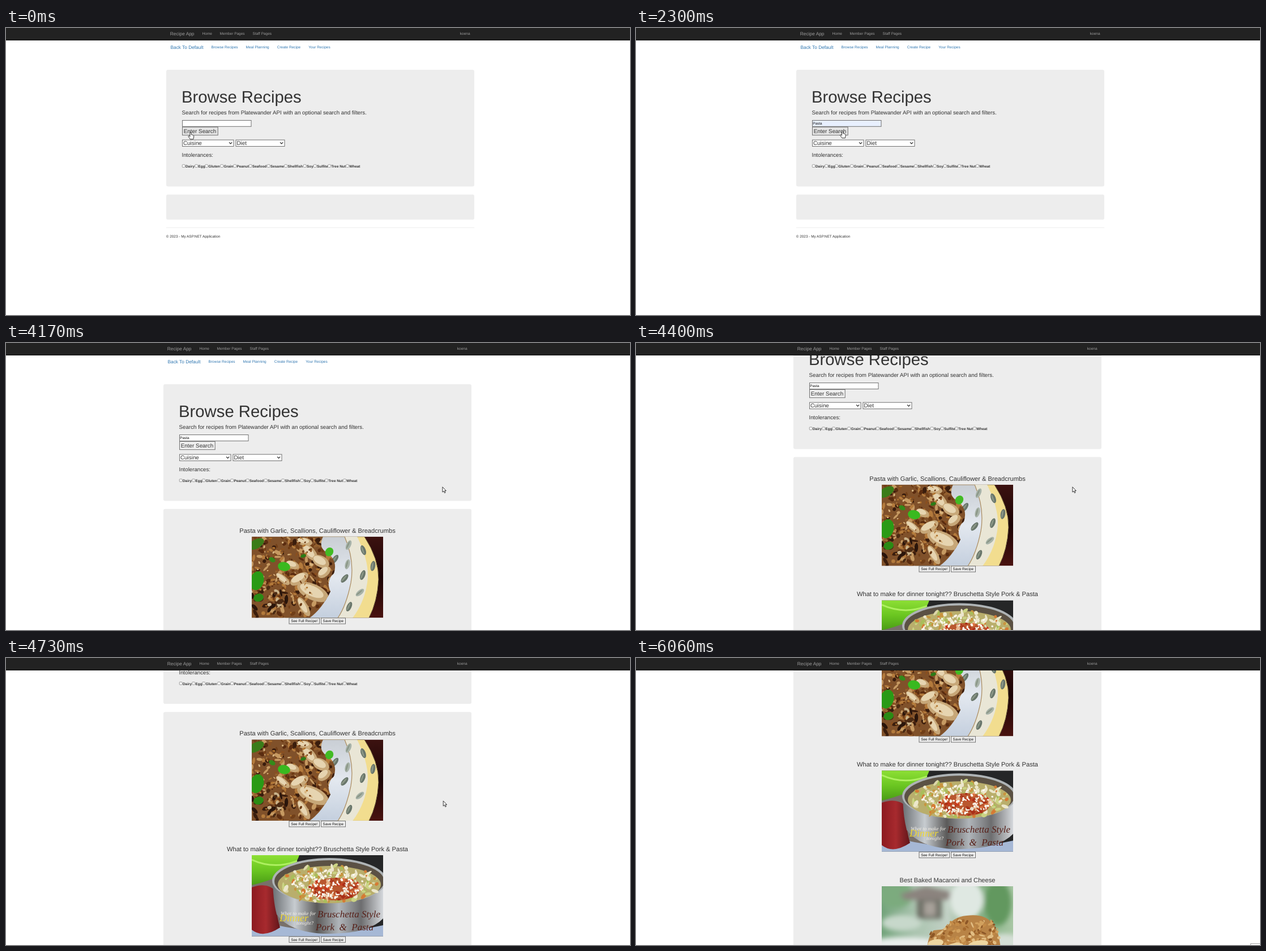
An HTML page for the animation above (6.12 s loop, 1102x508 px).

```html
<!DOCTYPE html>
<html lang="en">
<head>
<meta charset="utf-8">
<title>Recipe App</title>
<style>
html, body { margin: 0; width: 100%; height: 100%; overflow: hidden; background: #fff; }
svg { display: block; width: 1102px; height: 508px; }
text { font-family: "Liberation Sans", Arial, sans-serif; text-rendering: geometricPrecision; white-space: pre; }
</style>
</head>
<body>
<svg id="stage" viewBox="0 0 1102 508"></svg>
<script>
const LOOP = 6120, LOADED = 2960;
const INK = '#333', LINK = '#2f76b0', PANEL = '#ededed', PALE = '#9d9d9d';

// ---------- drawing helpers ----------
function add(parent, tag, attrs = {}) {
  const node = document.createElementNS('http://www.w3.org/2000/svg', tag);
  for (const key in attrs) node.setAttribute(key, attrs[key]);
  return parent.appendChild(node);
}
const group = (parent, attrs) => add(parent, 'g', attrs);
const path = (parent, d, fill, more) => add(parent, 'path', { d, fill, ...more });
const rect = (parent, x, y, width, height, fill, more) =>
  add(parent, 'rect', { x, y, width, height, fill, ...more });
const oval = (parent, cx, cy, rx, ry, fill, turn = 0) =>
  add(parent, 'ellipse', { cx, cy, rx, ry, fill, transform: `rotate(${turn} ${cx} ${cy})` });
function label(parent, x, y, size, str, fill = INK, more) {
  const node = add(parent, 'text', { x, y, 'font-size': size, fill, ...more });
  node.textContent = str;
  return node;
}
const framed = (parent, x, y, w, h, fill, line = '#707070') =>
  rect(parent, x + .5, y + .5, w - 1, h - 1, fill, { stroke: line, 'stroke-width': 1 });
function gradient(id, vertical, colours) {
  const g = add(defs, 'linearGradient', { id, x2: vertical ? 0 : 1, y2: vertical ? 1 : 0 });
  colours.forEach((c, i) => add(g, 'stop', { offset: i / (colours.length - 1), 'stop-color': c }));
  return `url(#${id})`;
}
function clip(id, d) {
  add(add(defs, 'clipPath', { id }), 'path', { d });
  return { 'clip-path': `url(#${id})` };
}
function seeded(seed) {
  return () => (seed = (seed * 16807) % 2147483647) / 2147483647;
}
function crumbs(parent, count, seed, place, size, colours) {
  const rnd = seeded(seed);
  for (let i = 0; i < count; i++) {
    const [x, y] = place(rnd);
    oval(parent, x, y, size * (.4 + rnd()), size * (.3 + rnd() * .5),
      colours[Math.floor(rnd() * colours.length)], rnd() * 180);
  }
}
const inOval = (cx, cy, rx, ry) => rnd => {
  const a = rnd() * Math.PI * 2, r = Math.sqrt(rnd());
  return [cx + Math.cos(a) * rx * r, cy + Math.sin(a) * ry * r];
};

const svg = document.getElementById('stage');
const defs = add(svg, 'defs');
const photoClip = clip('photo', 'M0 0H232V143.5H0Z');
const blur = add(defs, 'filter', { id: 'soft', x: '-20%', y: '-20%', width: '140%', height: '140%' });
add(blur, 'feGaussianBlur', { stdDeviation: 4 });

// ---------- photos, 232 x 143.5 each ----------
function plate(g) {
  rect(g, 0, 0, 232, 144, gradient('wood', true, ['#3c1210', '#1c0506', '#4a1310']));
  path(g, 'M60 0H199Q225 40 224 76Q222 115 207 144H60Z', '#f2dd8f', { stroke: '#55452f', 'stroke-width': 1 });
  path(g, 'M60 0H186Q206 40 205 72Q202 112 178 144H60Z', '#e9e6d6');
  path(g, 'M60 0H164Q182 42 175 82Q167 122 152 144H60Z',
    gradient('china', true, ['#c9ced4', '#e3e8ef', '#c4cfde']), { stroke: '#a98a5e', 'stroke-width': 1.2 });
  [[171, 15, 25], [197, 24, -20], [147, 40, 35], [169, 49, 15], [164, 74, 40],
   [196, 68, 20], [191, 99, 50], [172, 124, 25], [214, 52, 10]].forEach(([x, y, turn], i) => {
    oval(g, x, y, 4.2, 9, i % 3 ? '#69766b' : '#a8b3a9', turn);
    oval(g, x - 1, y, 1.4, 7, '#8b9787', turn);
  });
  const shape = 'M0 0H126Q117 18 131 27Q153 42 145 65Q130 78 139 97Q124 128 102 144H0Z';
  path(g, shape, '#80512a');
  const food = group(g, clip('food', shape));
  crumbs(food, 260, 71, r => [r() * 145, r() * 144], 5, ['#5a2c10', '#94602f', '#b37a3c', '#3a1d0d', '#c69a62', '#713f18']);
  [[103, 28, 18, 9, 50], [122, 44, 16, 10, 30], [108, 98, 30, 14, 25], [84, 75, 18, 9, -30],
   [72, 50, 12, 7, 20], [128, 63, 13, 8, -40], [92, 124, 19, 7, 60], [55, 75, 15, 6, 40],
   [93, 9, 14, 7, 10]].forEach(([x, y, a, b, turn]) => {
    oval(food, x, y, a, b, '#c7a778', turn);
    oval(food, x - 2, y - 2, a * .75, b * .65, '#e6d4b0', turn);
  });
  crumbs(food, 150, 19, inOval(55, 65, 65, 72), 2.6, ['#b1742f', '#6d3a13', '#d9b681', '#8b4f1e']);
  crumbs(food, 25, 33, inOval(20, 120, 45, 30), 6, ['#2a150b', '#4c2b14', '#c9b28a']);
  oval(g, 9, 78, 12, 17, '#2a9a16', 15);
  oval(g, 12, 108, 9, 7, '#2b8b15', -15);
  oval(g, 8, 13, 15, 8, '#3b7c19', -30);
  oval(g, 57, 53, 11, 8, '#39b91f', 10);
  oval(g, 137, 27, 7, 8, '#42bb24', 30);
  oval(g, 91, 34, 5, 3, '#2c7c17', -20);
  oval(g, 36, 41, 6, 4, '#348a1a', 30);
}

function pan(g) {
  rect(g, 0, 0, 232, 144, '#252627');
  path(g, 'M0 48L60 30L80 144H0Z', '#78706a');
  path(g, 'M0 112Q120 150 232 124V144H0Z', '#a6b8d5');
  path(g, 'M0 0H84Q74 31 34 43Q14 50 0 53Z', gradient('dish', true, ['#8ddf35', '#6bc621', '#4a9c15']));
  path(g, 'M0 8Q40 26 80 10', 'none', { stroke: '#aef060', 'stroke-width': 3 });
  path(g, 'M0 57Q28 46 46 66Q40 96 50 128Q20 148 0 132Z', gradient('cloth', false, ['#8c1a20', '#a72a2e', '#61161a']));
  path(g, 'M37 38Q37 78 44 105Q70 140 140 139Q208 138 232 112V32Z',
    gradient('steel', false, ['#6c7074', '#c7ccd0', '#5b5a59', '#b0b5ba', '#6d6d6f', '#d5d8dc']));
  oval(g, 137, 45, 101, 40, '#aeb3b5');
  oval(g, 137, 46, 97, 37, '#5b5144');
  oval(g, 137, 52, 91, 33, '#b9ae6c');
  crumbs(g, 170, 5, inOval(137, 50, 89, 33), 5, ['#dcd7a8', '#a9bd5b', '#ece7cb', '#c8943f', '#cbd384', '#d57b35']);
  oval(g, 148, 60, 43, 20, '#b9572f');
  crumbs(g, 70, 27, inOval(148, 60, 48, 21), 4, ['#c8391d', '#d96f3d', '#a93018', '#e8b58c']);
  crumbs(g, 150, 45, inOval(135, 52, 65, 25), 2.6, ['#f8f3e6', '#fffdf5', '#e9dfcc']);
  const script = { 'font-style': 'italic', style: 'font-family:"Liberation Serif",Times,serif' };
  label(g, 51, 106, 9, 'What to make for', '#f4f0e8', script);
  label(g, 49, 117, 18, 'Dinner', '#f0d832', script);
  label(g, 79, 123, 9, 'tonight?', '#f4f0e8', script);
  label(g, 116, 110, 17, 'Bruschetta Style', '#572019', script);
  label(g, 113, 133, 17, 'Pork  &  Pasta', '#572019', script);
}

function bake(g) {
  rect(g, 0, 0, 232, 144, gradient('garden', false, ['#72a37a', '#a9c3ae', '#c2d1c5', '#7fac7f', '#a9c7a5']));
  const haze = group(g, { filter: 'url(#soft)' });
  oval(haze, 25, 15, 30, 24, '#7cab7e');
  path(haze, 'M32 14L78 0L132 12V24H40Z', '#8b837e');
  rect(haze, 62, 24, 44, 34, '#6f7168');
  rect(haze, 75, 28, 20, 24, '#a7a19a');
  oval(haze, 150, 24, 30, 35, '#dfe8e2');
  oval(haze, 205, 30, 24, 40, '#62985f');
  oval(haze, 35, 65, 35, 14, '#c7d8cb');
  oval(haze, 40, 108, 75, 18, '#e9eeec');
  oval(haze, 215, 100, 35, 16, '#d5dfd6');
  path(g, 'M78 144Q78 88 92 78L112 76Q125 54 150 52Q184 48 196 67Q212 83 211 144Z', '#b88346');
  const top = r => [83 + r() * 124, 58 + r() * 84 + 8 * Math.abs(r() - .5)];
  const crust = group(g, clip('crust', 'M76 144Q76 86 91 76L111 74Q125 51 150 50Q186 46 199 66Q214 81 213 144Z'));
  crumbs(crust, 260, 88, top, 4.2, ['#d2a15e', '#a4692e', '#c38b48', '#e2bd82', '#8d5727']);
  [[95, 101, 14], [128, 108, 17], [170, 103, 18], [200, 114, 12]].forEach(([x, y, r]) =>
    oval(crust, x, y, r, 7, '#edd6a1', -10));
}

// ---------- page ----------
const shifted = group(svg);
const page = group(shifted);

[['Back To Default', 290.5, 8.3, 36.9], ['Browse Recipes', 362.6, 6.5, 36.2], ['Meal Planning', 423.5, 6.5, 36.2],
 ['Create Recipe', 478.7, 6.5, 36.2], ['Your Recipes', 534.3, 6.5, 36.2]]
  .forEach(([str, x, size, y]) => label(page, x, y, size, str, LINK));

rect(page, 283, 73.9, 544, 206.7, PANEL, { rx: 3 });
label(page, 310, 131.5, 29.3, 'Browse Recipes');
label(page, 310.6, 152.5, 9.75, 'Search for recipes from Platewander API with an optional search and filters.');
const field = framed(page, 311, 163, 122.5, 11.8, '#fff');
const query = label(page, 312.2, 171.2, 6.45, 'Pasta', '#111');
const caret = rect(page, 312.3, 165, .8, 7, '#111');
const button = framed(page, 311, 174.8, 63.7, 15.4, '#e9e9e9');
label(page, 313.8, 186, 9.85, 'Enter Search');

[['Cuisine', 311, 91.5], ['Diet', 405.5, 87]].forEach(([str, x, w]) => {
  framed(page, x, 197.6, w, 12.4, '#fff');
  label(page, x + 2, 207.3, 9.85, str);
  path(page, `M${x + w - 8.4} 202.3l2.5 2.6l2.5 -2.6`, 'none', { stroke: '#222', 'stroke-width': 1.2 });
});
label(page, 310.5, 228, 9.7, 'Intolerances:');
[['Dairy', 311], ['Egg', 333.5], ['Gluten', 351.5], ['Grain', 378.5], ['Peanut', 401.5], ['Seafood', 429],
 ['Sesame', 461], ['Shellfish', 491.5], ['Soy', 525], ['Sulfite', 543], ['Tree Nut', 568.3], ['Wheat', 600.3]]
  .forEach(([str, x]) => {
    rect(page, x + .3, 241.8, 4.8, 4.8, '#fff', { stroke: '#777', 'stroke-width': .7, rx: .8 });
    label(page, x + 6, 247, 6.4, str, INK, { 'font-weight': 700 });
  });

const empty = group(page);
rect(empty, 283, 294.7, 544, 44.5, PANEL, { rx: 3 });
rect(empty, 283, 353, 544, .8, '#eaeaea');
label(empty, 282.7, 370.5, 6.42, '© 2023 - My ASP.NET Application');

const results = group(page);
rect(results, 283, 294.7, 544, 900, PANEL, { rx: 3 });
[['Pasta with Garlic, Scallions, Cauliflower & Breadcrumbs', plate],
 ['What to make for dinner tonight?? Bruschetta Style Pork & Pasta', pan],
 ['Best Baked Macaroni and Cheese', bake]].forEach(([title, draw], i) => {
  const card = group(results, { transform: `translate(0 ${i * 204.6})` });
  label(card, 555, 336.5, 11.15, title, INK, { 'text-anchor': 'middle' });
  draw(group(group(card, { transform: 'translate(439 343.7)' }), photoClip));
  framed(card, 504.5, 487.3, 54.5, 11.3, '#efefef');
  framed(card, 561, 487.3, 44, 11.3, '#efefef');
  label(card, 508.2, 495.3, 6.45, 'See Full Recipe!', '#111');
  label(card, 564.6, 495.3, 6.45, 'Save Recipe', '#111');
});

// ---------- fixed bar ----------
rect(svg, 0, 0, 1102, 22, '#222');
rect(svg, 0, 21.3, 1102, .7, '#080808');
const bar = group(svg);
[['Recipe App', 289.8, 8.35, 13], ['Home', 346.6, 6.5, 12.3], ['Member Pages', 377.5, 6.5, 12.3],
 ['Staff Pages', 435.6, 6.5, 12.3], ['koena', 801.8, 6.5, 12.3]]
  .forEach(([str, x, size, y]) => label(bar, x, y, size, str, PALE));

// ---------- overlays ----------
const hints = group(svg);
rect(hints, 312.5, 176.5, 180, 39, '#fff', { stroke: '#c8c8c8', 'stroke-width': 1, rx: 1.5 });
rect(hints, 313, 183, 179, 15, '#e8e8e8');
label(hints, 319, 193, 6.45, 'Pasta', '#111');
const corner = rect(svg, 1085.5, 505.5, 30, 10, '#fff', { stroke: '#a5a5a5', 'stroke-width': 1 });

const cursor = group(svg);
const edge = { stroke: '#222', 'stroke-width': .9, 'stroke-linejoin': 'round' };
const looks = {
  hand: path(cursor, 'M-1.1 1Q0 -.7 1.1 1V4.6L4.6 5.6Q6 6.1 5.7 8L4.8 12.8H-.6L-4 8.2Q-4 6.6 -2.6 7L-1.1 8.2Z', '#fff', edge),
  arrow: path(cursor, 'M.4 .4V9.6L2.5 7.6L4 11L5.6 10.3L4.1 7.1H6.8Z', '#fff', edge),
  beam: path(cursor, 'M-1.5 -4.5H1.5M0 -4.5V4.5M-1.5 4.5H1.5', 'none', { stroke: '#222', 'stroke-width': .8 })
};

// ---------- motion ----------
const pointer = [
  [0, 326, 184], [50, 326, 185], [200, 331, 192], [410, 338, 167], [1100, 338, 167], [1350, 341, 188],
  [1710, 343, 189], [1800, 344, 188], [2120, 364.5, 182], [2300, 364.5, 182], [2400, 370, 177],
  [2600, 430, 148], [2910, 551, 283], [3560, 610, 330], [3760, 770.5, 254.4], [4400, 770.5, 254.4],
  [4730, 771.8, 252.5], [4810, 772, 253], [5040, 821.7, 293], [5250, 1000, 440], [5400, 1055, 510]
];
const scroll = [[4120, 0], [4170, .6], [4400, 92.6], [4730, 198.9], [5040, 313.6], [5160, 340], [5300, 349]];

function at(track, t) {
  let i = track.findIndex(step => step[0] > t);
  if (i === 0) return track[0].slice(1);
  if (i < 0) return track[track.length - 1].slice(1);
  const a = track[i - 1], b = track[i], k = (t - a[0]) / (b[0] - a[0]);
  return a.slice(1).map((v, j) => v + (b[j + 1] - v) * k);
}
const show = (node, on) => node.setAttribute('display', on ? 'inline' : 'none');
const between = (t, from, to) => t >= from && t < to;

function draw(t) {
  const loaded = t >= LOADED, dx = loaded ? -5 : 0;
  shifted.setAttribute('transform', `translate(${dx} 0)`);
  bar.setAttribute('transform', `translate(${dx} 0)`);
  page.setAttribute('transform', `translate(0 ${-at(scroll, t)[0]})`);
  show(empty, !loaded);
  show(results, loaded);

  const focused = between(t, 340, 2120);
  field.setAttribute('stroke', focused ? '#111' : '#707070');
  field.setAttribute('fill', between(t, 1760, LOADED) ? '#e8f0fe' : '#fff');
  show(query, t >= 1500);
  show(caret, between(t, 340, 840) || between(t, 1340, 1500));
  button.setAttribute('fill', t < 200 || between(t, 1950, 2420) ? '#e4e4e4' : '#efefef');
  show(hints, between(t, 1150, 1710));
  show(corner, t >= 6060);

  const [x, y] = at(pointer, t);
  cursor.setAttribute('transform', `translate(${x} ${y})`);
  const look = between(t, 280, 1150) ? 'beam' : t < 280 || between(t, 1950, 2420) ? 'hand' : 'arrow';
  for (const name in looks) show(looks[name], name === look);
  show(cursor, t < 5420);
}

const start = performance.now();
function tick() {
  draw((performance.now() - start) % LOOP);
  requestAnimationFrame(tick);
}
tick();
</script>
</body>
</html>
```
